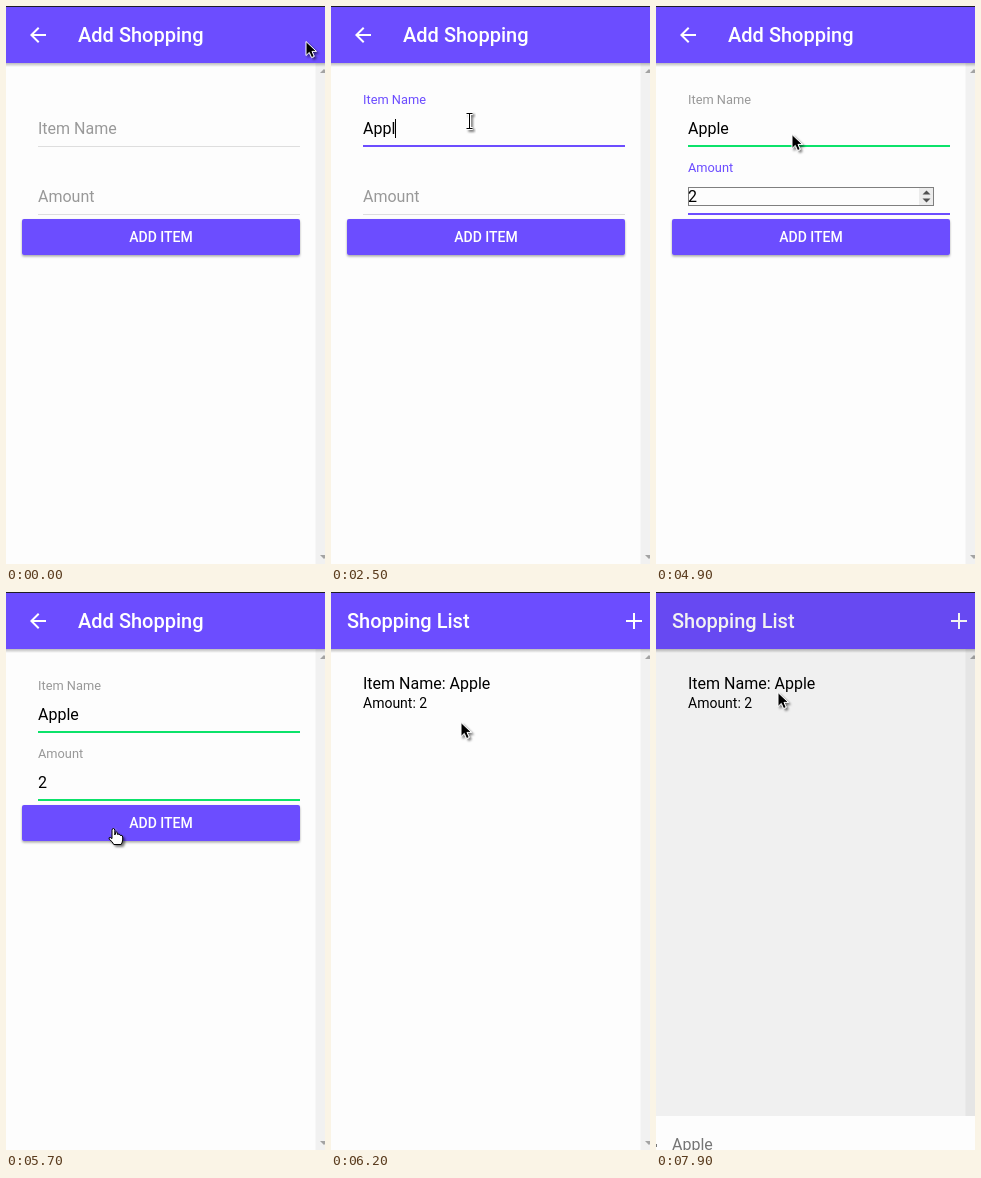
Animation, 319 px wide and 558 px high, one loop 8 s. Source, as an HTML page:

```html
<!DOCTYPE html>
<html lang="en">
<head>
<meta charset="utf-8">
<title>Shopping list</title>
<style>
html, body { margin: 0; width: 100%; height: 100%; overflow: hidden; background: #fdfdfd; }
svg { display: block; width: 319px; height: 558px; font: 16px Roboto, Arial, sans-serif; }
.title { font-size: 20px; font-weight: 500; fill: #fff; }
.btn { font-size: 14px; font-weight: 500; fill: #fff; text-anchor: middle; }
</style>
</head>
<body>
<svg viewBox="0 0 319 558">
  <defs>
    <linearGradient id="fade" x2="0" y2="1">
      <stop offset="0" stop-color="#000" stop-opacity=".26"/>
      <stop offset="1" stop-color="#000" stop-opacity="0"/>
    </linearGradient>
    <filter id="soft" x="-50%" y="-50%" width="200%" height="200%">
      <feDropShadow dx="2" dy="2" stdDeviation="1.1" flood-opacity=".5"/>
    </filter>
    <filter id="lift" x="-5%" y="-20%" width="110%" height="150%">
      <feDropShadow dx="0" dy="1.5" stdDeviation="1.2" flood-opacity=".34"/>
    </filter>
    <clipPath id="btnClip"><rect x="16" y="213" width="278" height="36" rx="2"/></clipPath>
    <g id="base">
      <rect width="319" height="558" fill="#fdfdfd"/>
      <rect x="309.5" y="57" width="10" height="501" fill="#f1f1f1"/>
      <path d="M314 67l4-4 4 4zM314 549l4 4 4-4z" fill="#a3a3a3"/>
      <rect y="57" width="319" height="4" fill="url(#fade)"/>
      <rect width="319" height="57" fill="#6c4dff"/>
    </g>
  </defs>

  <g id="list">
    <use href="#base"/>
    <text class="title" x="16" y="36">Shopping List</text>
    <path d="M295 29h16M303 21v16" stroke="#fff" stroke-width="2"/>
    <text x="32" y="97">Item Name: Apple</text>
    <text x="32" y="116" font-size="14">Amount: 2</text>
  </g>

  <g id="form">
    <use href="#base"/>
    <path transform="translate(20 17)" fill="#fff" d="M20 11H7.83l5.59-5.59L12 4l-8 8 8 8 1.41-1.41L7.83 13H20z"/>
    <text class="title" x="72" y="36">Add Shopping</text>

    <g id="name">
      <text class="label">Item Name</text>
      <text class="value" x="32" y="128"></text>
      <rect class="line" x="32" width="262"/>
      <rect class="caret" y="113" width="1" height="19"/>
    </g>
    <g id="amount" transform="translate(0 68)">
      <text class="label">Amount</text>
      <g id="spin">
        <rect x="32.5" y="113.5" width="245" height="18" fill="none" stroke="#000" stroke-dasharray="1 1"/>
        <rect x="263" y="114" width="14" height="17" fill="#ececec"/>
        <path d="M266.5 120.5l4-4 4 4zM266.5 124.5l4 4 4-4z" fill="#505050"/>
      </g>
      <text class="value" x="32" y="128"></text>
      <rect class="line" x="32" width="262"/>
      <rect class="caret" y="115" width="1" height="15"/>
    </g>

    <rect x="16" y="213" width="278" height="36" rx="2" fill="#6c4dff" filter="url(#lift)"/>
    <circle id="ripple" cx="108" cy="240" fill="#fff" clip-path="url(#btnClip)"/>
    <text class="btn" x="155" y="236">ADD ITEM</text>
  </g>

  <g id="sheet">
    <rect id="dim" width="319" height="558"/>
    <g id="panel">
      <rect width="319" height="300" fill="#fdfdfd"/>
      <text x="16" y="34" fill="#757575">Apple</text>
      <rect y="28" width="1" height="3" fill="#777"/>
    </g>
  </g>

  <rect width="319" height="1" fill="#1d1b26"/>

  <g id="cursor" filter="url(#soft)">
    <path id="arrow" d="M0 .5V14.5L3.3 11.4 5.6 16.6 8.2 15.4 6 10.4H10.4Z" fill="#000" stroke="#fff" stroke-width="1"/>
    <g id="beam" fill="none">
      <path d="M-2.5-5.5H0H3.5M.5-5.5V9.5M-2.5 9.5H3.5" stroke="#fff" stroke-width="3"/>
      <path d="M-2.5-5.5H0H3.5M.5-5.5V9.5M-2.5 9.5H3.5" stroke="#000"/>
    </g>
    <path id="hand" fill="#fff" stroke="#000" stroke-width="1" stroke-linejoin="round"
      d="M-1 1.2Q-1-.5.3-.5T1.8 1.2V6Q4-.0 4.5 5.4 6.6 4.2 7.2 6.4 9.6 5.6 9.7 8V11Q9.5 13 8.2 15.5H.8Q-.5 12.5-3.8 10.2-4.6 8.4-2.8 8.4L-1 9.6Z"/>
  </g>
</svg>

<script>
const LOOP = 8000, STEP = 100;
const PURPLE = '#6c4dff', GREEN = '#0ce26a', GREY = '#999';
const $ = id => document.getElementById(id);
const clamp = v => Math.min(1, Math.max(0, v));
const set = (el, attrs) => { for (const k in attrs) el.setAttribute(k, attrs[k]); };
const show = (el, on) => el.style.display = on ? '' : 'none';
const smooth = p => p * p * (3 - 2 * p);

// time, x, y of the pointer tip
const path = [
  [0, 300, 35], [100, 286, 46], [200, 240, 75], [300, 190, 98], [400, 152, 110], [500, 138, 113],
  [4800, 138, 113], [4900, 136, 128], [5000, 130, 162], [5100, 120, 200], [5200, 110, 228], [5300, 107, 237],
  [6000, 107, 237], [6200, 130, 130], [6400, 164, 26], [6500, 160, 38], [6700, 117, 103], [6800, 106, 119],
  [7100, 106, 119], [7200, 110, 115], [7400, 122, 100], [8000, 122, 100]
];

const fields = {
  name: { focus: 990, blur: 3160, keys: [[1800, 'A'], [2200, 'Ap'], [2300, 'App'], [2500, 'Appl'], [2700, 'Apple']],
    carets: [[1100, 1600], [1800, 3200]] },
  amount: { focus: 3140, blur: 5600, keys: [[4400, '2']], carets: [[3300, 3800], [4400, 4900]] }
};
for (const id in fields) {
  const f = fields[id];
  for (const part of ['label', 'value', 'line', 'caret']) f[part] = $(id).querySelector('.' + part);
}

function pointAt(t) {
  const i = path.findIndex(p => p[0] > t);
  const [t0, x0, y0] = path[i - 1], [t1, x1, y1] = path[i];
  const k = (t - t0) / (t1 - t0);
  return [x0 + (x1 - x0) * k, y0 + (y1 - y0) * k];
}

function drawField(f, t) {
  const up = smooth(clamp((t - f.focus) / 150));
  const active = t >= f.focus && t < f.blur;
  const touched = t >= f.focus;
  const typed = f.keys.filter(k => t >= k[0]).pop();
  set(f.label, {
    transform: `translate(32 ${128 - 30 * up}) scale(${1 - .2 * up})`,
    fill: active ? PURPLE : GREY
  });
  f.value.textContent = typed ? typed[1] : '';
  set(f.line, {
    y: touched ? 139 : 140, height: touched ? 2 : 1,
    fill: active ? PURPLE : touched ? GREEN : '#dedede'
  });
  const lit = f.carets.some(([a, b]) => t >= a && t < b);
  show(f.caret, lit);
  if (lit) set(f.caret, { x: 32 + (typed ? Math.round(f.value.getComputedTextLength()) : 0) });
}

function drawCursor(t) {
  const [x, y] = pointAt(t);
  const kind = t >= 1000 && t < 3300 ? 'beam' : t >= 5200 && t < 5900 ? 'hand' : 'arrow';
  for (const k of ['arrow', 'beam', 'hand']) show($(k), k === kind);
  set($('cursor'), { transform: `translate(${Math.round(x)} ${Math.round(y)})` });
}

function draw(t) {
  drawField(fields.name, t);
  drawField(fields.amount, t);
  show($('spin'), t >= 3200 && t < 5600);

  const press = clamp((t - 5690) / 210);
  set($('ripple'), { r: 86 * press, opacity: .14 });

  // the form drops and fades away, accelerating
  const out = Math.pow(clamp((t - 5745) / 200), 1.7);
  set($('form'), { transform: `translate(0 ${Math.round(40 * out)})`, opacity: 1 - out });
  show($('form'), out < 1);

  const rise = clamp((t - 7800) / 400);
  show($('sheet'), t >= 7900);
  set($('dim'), { opacity: .2 * rise });
  set($('panel'), { transform: `translate(0 ${558 - 136 * rise})` });

  drawCursor(t);
}

const start = performance.now();
function tick() {
  const t = (performance.now() - start) % LOOP;
  draw(Math.floor(t / STEP) * STEP);
  requestAnimationFrame(tick);
}
tick();
</script>
</body>
</html>
```
